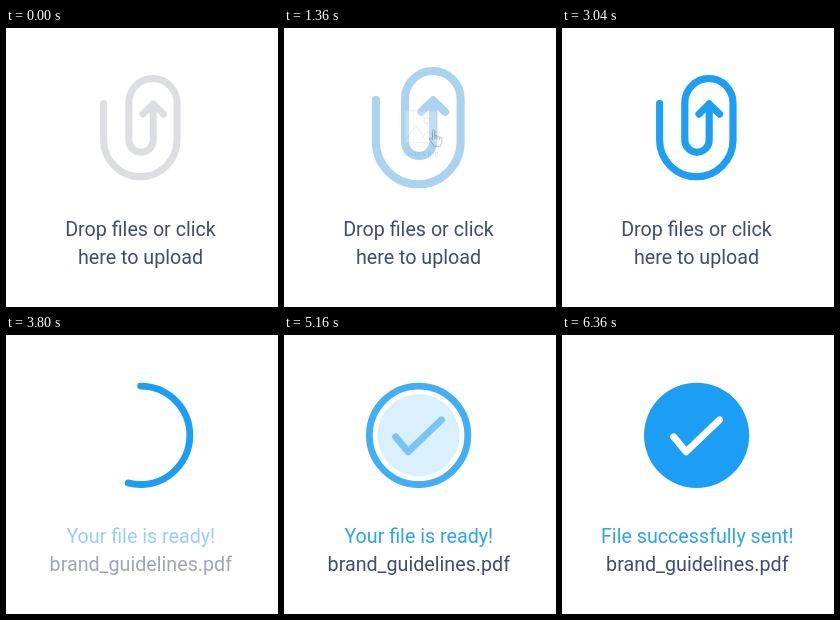
Recreate the animation shown at these times as an HTML page. Size 272 by 279 pixels, loop 7000 ms.

```html
<!DOCTYPE html>
<html lang="en">
<head>
<meta charset="utf-8">
<title>File upload</title>
<style>
  html, body { margin: 0; width: 100%; height: 100%; overflow: hidden; background: #fff; }
  svg { display: block; width: 272px; height: 279px; }
  path, circle, rect { fill: none; stroke-linecap: round; stroke-linejoin: round; }
  text { text-anchor: middle; font: 19.7px Roboto, Arial, sans-serif; fill: #434a76; }
  .blue { fill: #2fa2f3; }
  .thick { stroke-width: 7; }
  .solid { stroke: #1d9ef5; }
  .thin { stroke: #cfd2e2; stroke-width: 3; stroke-linejoin: miter; }
  #label { font: 16px "Open Sans", "Noto Sans", sans-serif; fill: #3aa8f7; }
  #hand path { fill: #fff; stroke: #111; stroke-width: 1.9; }
</style>
</head>
<body>
<svg viewBox="0 0 272 279">
  <defs>
    <path id="wire" d="M97.600 75.500V112A36.700 36.700 0 0 0 171 112V74.700A24.100 24.100 0 0 0 122.800 74.700V112A12.200 12.200 0 0 0 147.200 112V78"/>
    <path id="tip" d="M137 86L147.200 76L157.600 86"/>
  </defs>
  <g id="clip">
    <g id="base" class="thick"><use href="#wire"/><use href="#tip"/></g>
    <g class="thick solid">
      <path id="fill" pathLength="1"/>
      <path id="headL" pathLength="1" d="M147.200 76L137 86"/>
      <path id="headR" pathLength="1" d="M147.200 76L157.600 86"/>
    </g>
  </g>
  <g id="file">
    <rect class="thin" x="-32.500" y="-32.500" width="65" height="65" style="fill:#fff"/>
    <path class="thin" d="M-32 29L-10.500 -3L12 31M5 19L15.500 9.500L32 28"/>
    <circle class="thin" cx="12" cy="-12" r="5.500"/>
    <text id="label" x="-.5" y="60">Image.jpg</text>
    <g id="hand">
      <path d="M23.500 26V10C23.500 6.300 28.300 6.300 28.300 10V19C29 17 33 17.500 33 20.500C34 18.500 38 19 38 22C39 20.500 42.800 21 42.800 24V31C42.800 34 40 36 40 40H26.500C26 36 20 31 17.500 25.500C16.500 22.500 20 21.500 23.500 26Z"/>
      <path d="M28.300 19V24M33 20.500V25M38 22V26"/>
    </g>
  </g>
  <g transform="translate(134.600 100.300)">
    <circle id="ring" class="solid" pathLength="1" r="49.200" stroke-width="6.800" transform="rotate(-90)"/>
    <circle id="disc" r="52.600" style="fill:#1d9ef5"/>
    <path id="check" pathLength="1" d="M-23 1.500L-10.500 16.500L23 -15.500" stroke-width="6.800"/>
  </g>
  <g id="drop">
    <text x="134.500" y="207.600">Drop files or click</text>
    <text x="134.500" y="235.600">here to upload</text>
  </g>
  <g id="ready">
    <text class="blue" x="134.800" y="207.600">Your file is ready!</text>
    <text x="134.800" y="235.600">brand_guidelines.pdf</text>
  </g>
  <g id="sent">
    <text class="blue" x="135.300" y="207.600">File successfully sent!</text>
    <text x="135.300" y="235.600">brand_guidelines.pdf</text>
  </g>
</svg>
<script>
const LOOP = 7000, STEP = 40;
const el = id => document.getElementById(id);
const span = (t, a, b) => Math.min(1, Math.max(0, (t - a) / (b - a)));
const sine = p => (1 - Math.cos(Math.PI * p)) / 2;
const cubic = p => p < .5 ? 4 * p ** 3 : 1 - 4 * (1 - p) ** 3;
const ease = (t, a, b) => sine(span(t, a, b));
const lerp = (a, b, p) => a + (b - a) * p;
const mix = (a, b, p) => `rgb(${a.map((v, i) => Math.round(lerp(v, b[i], p)))})`;
const fade = (id, v) => el(id).setAttribute('opacity', v);
const place = (id, value) => el(id).setAttribute('transform', value);

const GREY = [220, 222, 226], PALE = [170, 211, 239];
const BLUE = [29, 158, 245], WHITE = [255, 255, 255];

el('fill').setAttribute('d', el('wire').getAttribute('d'));

function draw(id, p) {
  const s = el(id).style;
  s.visibility = p > 0 ? 'visible' : 'hidden';
  s.strokeDasharray = p < 1 ? `${p} 2` : 'none';
}

function drawClip(t) {
  const lift = .19 * (ease(t, 400, 1120) - ease(t, 1200, 1760));
  const leave = ease(t, 3240, 3600);
  place('clip', `translate(134.500 100) scale(${1 + lift + .07 * leave}) translate(-134.500 -100)`);
  fade('clip', 1 - leave);
  el('base').setAttribute('stroke', mix(GREY, PALE, ease(t, 480, 920)));
  // The last part of the stroke is the arrow head.
  const done = ease(t, 1600, 3000) / .96;
  const head = span(done, 1, 1 / .96);
  draw('fill', Math.min(1, done));
  draw('headL', head);
  draw('headR', head);
}

function drawFile(t) {
  const move = cubic(span(t, 400, 1080));
  const gone = ease(t, 1100, 1500);
  const x = lerp(310, 142, move) - 7 * gone;
  const y = lerp(118, 95, move) - 30 * Math.sin(Math.PI * move) + 5 * gone;
  place('file', `translate(${x} ${y}) scale(${1 - .7 * gone})`);
  fade('file', t < 400 ? 0 : 1 - gone);
}

function drawBadge(t) {
  const solid = ease(t, 4900, 5900);
  draw('ring', ease(t, 3400, 4160));
  fade('ring', 1 - ease(t, 5000, 5600));
  place('disc', `scale(${lerp(.74, 1, solid)})`);
  fade('disc', solid);
  draw('check', ease(t, 4160, 4600));
  el('check').setAttribute('stroke', mix(BLUE, WHITE, ease(t, 4900, 5500)));
}

function drawText(t) {
  fade('drop', 1 - ease(t, 3240, 3560));
  fade('ready', ease(t, 3520, 4080) * (1 - ease(t, 5720, 6160)));
  fade('sent', ease(t, 5840, 6360));
}

function render(t) {
  drawClip(t);
  drawFile(t);
  drawBadge(t);
  drawText(t);
}

const start = performance.now();
function tick() {
  const t = (performance.now() - start) % LOOP;
  render(Math.floor(t / STEP) * STEP);
  requestAnimationFrame(tick);
}
tick();
</script>
</body>
</html>
```
